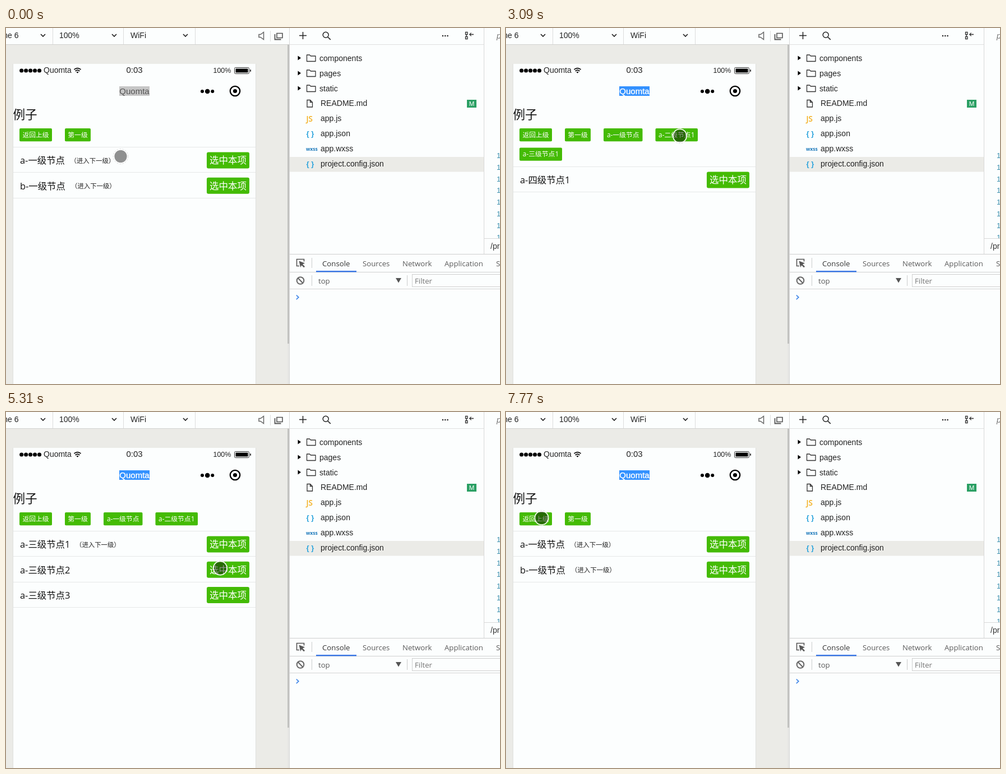
Recreate the animation shown at these times as an HTML page. Size 881 by 635 pixels, loop 8000 ms.

```html
<!DOCTYPE html>
<html lang="zh-CN">
<head>
<meta charset="utf-8">
<title>Tree picker demo</title>
<style>
html, body { margin: 0; width: 100%; height: 100%; overflow: hidden; background: #fcfefe; }
svg { display: block; width: 881px; height: 635px; }
text { white-space: pre; }
.ui { font-family: "Liberation Sans", Arial, sans-serif; }
.tool { font-family: "Open Sans", "Noto Sans", sans-serif; }
.cjk { font-family: "Open Sans", "Noto Sans CJK SC", "Noto Sans CJK", sans-serif; }
</style>
</head>
<body>
<svg id="stage" viewBox="0 0 881 635" xmlns="http://www.w3.org/2000/svg"></svg>
<script>
const LOOP = 8000;
const APP = "Quomta";
const GREEN = "#44bb04";
const PAPER = "#fcfefe";

// Start time of each list level
const levelSteps = [[0, 1], [520, 2], [780, 3], [1460, 4], [3460, 3], [6930, 2], [7770, 1]];

// Start time and centre of each pointer position
const pointerSteps = [
  [0, 204.5, 229], [2670, 255, 221], [2790, 295.5, 210.5], [2940, 307, 201.5],
  [3090, 310, 192.5], [4230, 310.5, 197.5], [4350, 314, 203], [4470, 324, 212],
  [4590, 337, 218.5], [4740, 364, 228], [4860, 394, 233.5], [5020, 408, 237.5],
  [5160, 414, 254], [5310, 382, 278.5], [5430, 312, 282], [5550, 239.5, 254.5],
  [5700, 185.5, 228.5], [5850, 143, 207], [5970, 103.5, 192], [6120, 67.5, 189.5],
  [6400, 64.5, 189], [6550, 63.5, 189]
];

const crumbs = [
  [24, 179, 58, "返回上级"], [105, 179, 46, "第一级"], [174, 179, 69.5, "a-一级节点"],
  [266.5, 179, 75.5, "a-二级节点1"], [24, 213.5, 76, "a-三级节点1"]
];

// Label and the place of its hint, if it can be opened
const levels = {
  1: [["a-一级节点", 114.5], ["b-一级节点", 116]],
  2: [["a-二级节点1", 124], ["a-二级节点2"]],
  3: [["a-三级节点1", 124], ["a-三级节点2"], ["a-三级节点3"]],
  4: [["a-四级节点1"]]
};

const rect = (x, y, w, h, fill, more = "") =>
  `<rect x="${x}" y="${y}" width="${w}" height="${h}" fill="${fill}" ${more}/>`;
const dot = (x, y, r, fill, more = "") =>
  `<circle cx="${x}" cy="${y}" r="${r}" fill="${fill}" ${more}/>`;
const line = (d, stroke, width = 1, more = "") =>
  `<path d="${d}" fill="none" stroke="${stroke}" stroke-width="${width}" ${more}/>`;
const fillPath = (d, fill) => `<path d="${d}" fill="${fill}"/>`;
const text = (cls, x, y, size, fill, s, more = "") =>
  `<text class="${cls}" x="${x}" y="${y}" font-size="${size}" fill="${fill}" ${more}>${s}</text>`;
const middle = 'text-anchor="middle"';
const bold = 'font-weight="700"';

function simulatorBar() {
  const chevron = x => line(`M${x - 4} 11l4 4 4-4`, "#222", 1.7);
  return rect(0, 0, 505, 29, PAPER) + rect(0, 29, 505, 1, "#d2d2d0") +
    [83, 209, 337].map(x => rect(x, 0, 1, 29, "#dcdcdc")).join("") +
    text("ui", 22.5, 17.5, 14, "#222", "ne 6", 'text-anchor="end"') +
    text("ui", 95, 17.5, 14, "#222", "100%") +
    text("ui", 222, 17.5, 14, "#222", "WiFi") +
    [66, 193, 320].map(chevron).join("") +
    line("M451 11.5h3l5.5-4v13l-5.5-4h-3z", "#666", 1.5) +
    rect(471, 5, 1, 19, "#ddd") +
    line("M483 9.5h10v8h-10z", "#555", 1.6) +
    line("M479.5 11v9.5h11", "#555", 1.8);
}

function phone() {
  let s = rect(0, 30, 502, 605, "#ebebe7") + rect(12, 64, 434, 571, "#dfe0de") +
    rect(13, 64, 432, 571, PAPER) +
    rect(502, 30, 3, 605, "#e6e6e4") + rect(502, 30, 3, 533, "#c2c2c0");
  for (let i = 0; i < 5; i++) s += dot(27.7 + i * 7.95, 76, 3.6, "#000");
  s += text("ui", 67, 80, 14, "#222", APP) +
    line("M121.5 74.2q6-5 12 0M123.6 76.8q3.9-3.2 7.8 0", "#000", 1.7) +
    fillPath("M125.4 78.5q2.1-1.6 4.2 0l-2.1 2.3z", "#000") +
    text("ui", 229, 80, 15, "#222", "0:03", middle) +
    text("ui", 369.5, 80, 12.4, "#222", "100%") +
    rect(407.5, 70.5, 26, 11, "none", 'rx="2" stroke="#333"') +
    rect(409.5, 72.5, 22, 7, "#000", 'rx=".6"') + rect(435, 74, 2, 4, "#333", 'rx="1"') +
    dot(350, 113, 3, "#000") + dot(359.2, 113, 4.3, "#000") + dot(368.3, 113, 3, "#000") +
    dot(408.5, 112.5, 8.7, "none", 'stroke="#000" stroke-width="2.3"') + dot(408.5, 112.5, 3.6, "#000") +
    text("cjk", 12.5, 162, 21.6, "#111", "例子");
  return s;
}

function fileTree() {
  let s = rect(505, 0, 1, 635, "#d6d6d6") + rect(506, 29, 346, 1, "#dfdfdf") +
    line("M523 13.5h13M529.5 7v13", "#222", 1.5) +
    dot(570.2, 12.2, 5, "none", 'stroke="#222" stroke-width="1.5"') + line("M573.8 16l5 4.8", "#222", 1.6) +
    [779, 783.3, 787.6].map(x => dot(x, 14, 1.3, "#222")).join("") +
    line("M819.5 7.5h3.5v4h-3.5zM819.5 15.5h3.5v4h-3.5zM821.2 11v5", "#333", 1.3) +
    line("M834 11.5h-7M829.7 8.6l-3 2.9 3 2.9", "#333", 1.3) +
    rect(506, 230, 346, 26.5, "#ebebe7");
  ["components", "pages", "static"].forEach((name, i) => {
    const y = 53.5 + i * 27;
    s += fillPath(`M520.5 ${y - 4}l5.5 4-5.5 4z`, "#000") +
      line(`M536.5 ${y - 5.5}h5l2 2h8.5v9.5h-15.5z`, "#333", 1.3, 'stroke-linejoin="round"') +
      text("ui", 559, y + 5, 14, "#222", name);
  });
  const files = ["README.md", "app.js", "app.json", "app.wxss", "project.config.json"];
  files.forEach((name, i) => s += text("ui", 561, 139.3 + i * 27, 14, "#222", name));
  s += line("M537 128.5h5.5l4 4v8.5h-9.5zM542.5 128.5v4h4", "#333", 1.3) +
    text("tool", 535.5, 167, 13.5, "#f3ae1c", "JS", 'font-weight="600"') +
    text("ui", 535.5, 192.5, 13, "#2aa3dc", "{ }", bold) +
    text("tool", 535, 219, 8.6, "#1a78ba", "wxss", bold) +
    text("ui", 535.5, 246.5, 13, "#2aa3dc", "{ }", bold) +
    rect(822, 128, 17, 14, "#2a9f63") +
    text("ui", 830.5, 139.3, 11.5, "#fff", "M", middle);
  return s;
}

function editor() {
  let s = rect(852, 0, 1, 403, "#d8d8d8") +
    text("ui", 875, 19, 14, "#777", "p", 'font-style="italic"');
  for (let i = 0; i < 8; i++) s += text("ui", 875, 232 + i * 20.8, 13, "#3a8fad", "1");
  return s + rect(853, 375, 28, 28, PAPER) + rect(853, 375, 28, 1, "#d8d8d8") +
    text("ui", 864, 393.5, 14, "#333", "/pr");
}

function devtools() {
  const tabs = [[564, "Console", "#333"], [636, "Sources"], [707, "Network"], [782, "Application"], [874, "S"]];
  return rect(506, 403, 375, 1, "#cfcfcf") + rect(506, 435, 375, 1, "#d0d0d0") + rect(506, 465, 375, 1, "#d4d4d4") +
    line("M523 424.5h-4.5v-12h13v4", "#555", 1.6) +
    fillPath("M522.5 415.5l10.5 4-4 2 4 4-1.8 1.8-4-4-2 3.6z", "#555") +
    rect(545, 410, 1, 18, "#ccc") +
    tabs.map(([x, s, c]) => text("tool", x, 425, 13.2, c || "#5a5a5a", s)).join("") +
    rect(553, 433, 72, 2.4, "#3b78e7") +
    dot(525, 450.5, 6.3, "none", 'stroke="#666" stroke-width="2"') + line("M520.6 446l8.8 9", "#666", 2) +
    rect(545, 441, 1, 19, "#ccc") + text("tool", 557, 455.8, 13.2, "#5a5a5a", "top") +
    fillPath("M695 446h10l-5 8.5z", "#555") + rect(715, 441, 1, 19, "#ccc") +
    rect(724.5, 439.5, 170, 22, PAPER, 'stroke="#cfcfcf"') +
    text("tool", 729, 455.8, 13.2, "#757575", "Filter") +
    line("M517.8 476.5l4 3.8-4 3.8", "#3f86e8", 1.7);
}

function list(level) {
  const shown = crumbs.slice(0, level + 1);
  const top = level > 3 ? 247 : 212;
  let s = shown.map(([x, y, w, label]) =>
    rect(x, y, w, 23.2, GREEN, 'rx="2"') +
    text("cjk", x + w / 2, y + 15.7, 11.8, "#fff", label, middle)).join("");
  s += rect(13, top, 432, 1, "#e6e8e8");
  levels[level].forEach(([label, hint], i) => {
    const y = top + i * 45.2;
    s += rect(13, Math.round(y + 45.4), 432, 1, "#e6e8e8") +
      text("cjk", 25, y + 30.3, 16.4, "#111", label) +
      (hint ? text("cjk", hint, y + 29, 11.4, "#222", "（进入下一级）") : "") +
      rect(358, y + 9.6, 76, 29, GREEN, 'rx="3"') +
      text("cjk", 396, y + 30.4, 16.5, "#fff", "选中本项", middle);
  });
  return s;
}

const title = active =>
  rect(202, 104, 54, 17, active ? "#3391ff" : "#c6c6c6") +
  text("ui", 229, 117.6, 15, active ? "#fff" : "#555", APP,
    middle + (active ? ' stroke="#fff" stroke-width=".35"' : ""));

const pointer = dot(0, 0, 11.3, "#000", 'fill-opacity=".43"') +
  dot(0, 0, 12.2, "none", 'stroke="#fff" stroke-opacity=".9" stroke-width="1.9"') +
  dot(0, 0, 13.3, "none", 'stroke="#000" stroke-opacity=".2" stroke-width=".7" stroke-dasharray="3 2"');

const stage = document.getElementById("stage");
stage.innerHTML = rect(0, 0, 881, 635, PAPER) + simulatorBar() + phone() + fileTree() + editor() + devtools() +
  '<g id="title"></g><g id="list"></g>' + `<g id="pointer">${pointer}</g>`;
const [titleNode, listNode, pointerNode] = ["title", "list", "pointer"].map(id => document.getElementById(id));

const stepAt = (steps, t) => steps.reduce((now, step) => step[0] <= t ? step : now);

let lastLevel, lastActive;
function render(t) {
  const level = stepAt(levelSteps, t)[1];
  const active = t >= 390;
  const [, x, y] = stepAt(pointerSteps, t);
  if (level !== lastLevel) listNode.innerHTML = list(lastLevel = level);
  if (active !== lastActive) titleNode.innerHTML = title(lastActive = active);
  pointerNode.setAttribute("transform", `translate(${x} ${y})`);
}

const start = performance.now();
function tick() {
  render((performance.now() - start) % LOOP);
  requestAnimationFrame(tick);
}
tick();
</script>
</body>
</html>
```
